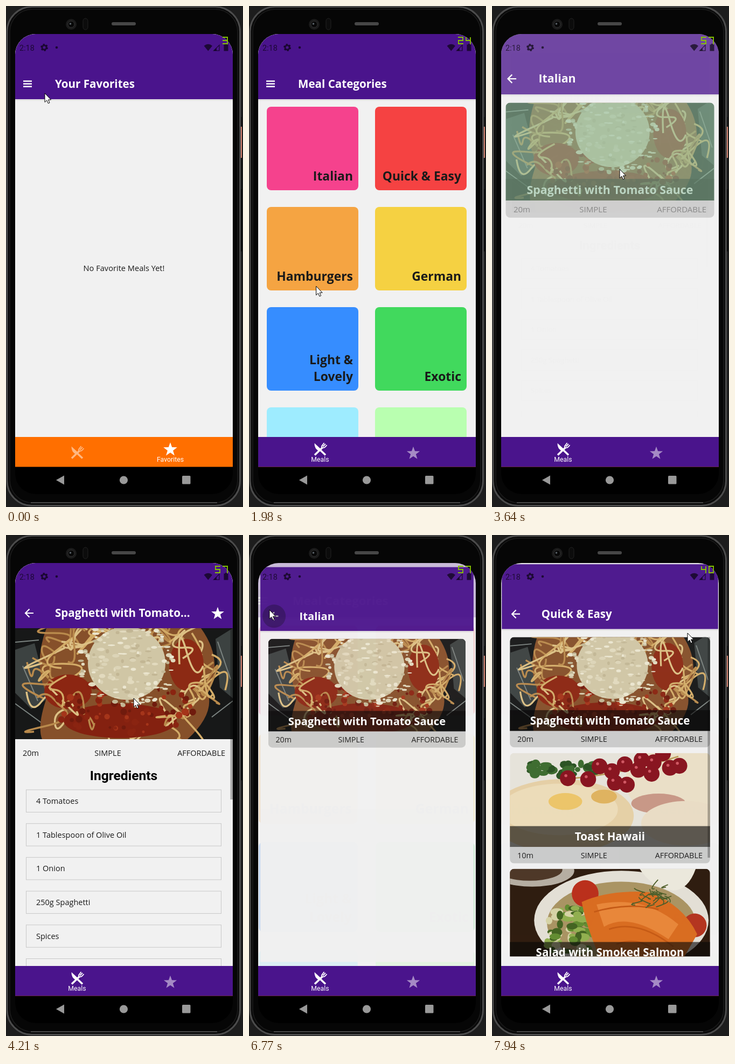
An HTML page that plays this animation: 440 by 930 pixels, repeating every 8 s.

```html
<!DOCTYPE html>
<html lang="en">
<head>
<meta charset="utf-8">
<title>Meals app</title>
<style>
html, body { margin: 0; width: 100%; height: 100%; overflow: hidden; background: #1d1d1d; }
svg { display: block; }
text { font-family: "Open Sans", sans-serif; white-space: pre; }
.b { font-weight: 700; }
.r { font-family: Roboto, sans-serif; }
</style>
</head>
<body>
<svg id="stage" width="440" height="930" viewBox="0 0 440 930"></svg>
<script>
const LOOP = 8000, PURPLE = '#4a148c', ORANGE = '#ff6f00', PAPER = '#f1f1f1';
const clamp = v => Math.max(0, Math.min(1, v));
let seed = 7;
const rnd = (a = 0, b = 1) => {
  seed = (seed * 16807) % 2147483647;
  return a + (b - a) * seed / 2147483647;
};
const pick = list => list[Math.floor(rnd(0, list.length))];
const times = (n, f) => Array.from({ length: n }, (_, i) => f(i)).join('');

// ---- drawing helpers
const rect = (x, y, w, h, fill, more = '') => `<rect x="${x}" y="${y}" width="${w}" height="${h}" fill="${fill}" ${more}/>`;
const oval = (x, y, rx, ry, fill, more = '') => `<ellipse cx="${x}" cy="${y}" rx="${rx}" ry="${ry}" fill="${fill}" ${more}/>`;
const dot = (x, y, r, fill, more) => oval(x, y, r, r, fill, more);
const path = (d, fill, more = '') => `<path d="${d}" fill="${fill}" ${more}/>`;
const line = (d, color, w, more = '') => path(d, 'none', `stroke="${color}" stroke-width="${w}" ${more}`);
const text = (x, y, str, size, fill = '#1a1a1a', cls = '', anchor = 'start') =>
  `<text x="${x}" y="${y}" font-size="${size}" fill="${fill}" class="${cls}" text-anchor="${anchor}">${str}</text>`;
const group = (id, body, more = '') => `<g id="${id}" ${more}>${body}</g>`;

// ---- dishes, each in a 404 x 206 box
function pasta() {
  const around = (cx, cy, rx, ry, f) => {
    const a = rnd(0, 6.283), r = Math.sqrt(rnd());
    return f(cx + rx * r * Math.cos(a), cy + ry * r * Math.sin(a));
  };
  const strand = () => {
    const a = rnd(0, 6.283), x = 207 + 145 * Math.cos(a), y = 90 + 100 * Math.sin(a);
    const q = () => rnd(-34, 34).toFixed(0);
    return line(`M${x.toFixed(0)} ${y.toFixed(0)}q${q()} ${q()} ${q()} ${q()}t${q()} ${q()}`, pick(['#d3ac68', '#b98a4c', '#dcc084']), 3.5);
  };
  return rect(0, 0, 404, 206, '#171818')
    + path('M0 40L36 28 62 130 30 150 0 120ZM372 20L404 0V130L380 110Z', '#3c4241')
    + line('M0 26L44 22M14 70L42 135M0 140L55 180M376 25L400 95M365 165L404 135', '#7c8481', 2)
    + path('M58 0Q32 70 60 125 40 180 50 206H320Q370 160 358 120 388 60 345 0Z', '#86502a')
    + times(55, strand)
    + oval(98, 118, 44, 32, '#8c2612') + oval(195, 172, 105, 32, '#842110') + oval(318, 68, 32, 48, '#8c2a14')
    + times(32, strand)
    + times(90, () => around(205, 145, 140, 50, (x, y) => dot(x, y, rnd(2, 7), pick(['#a5351a', '#701b0d', '#8a2411']))))
    + oval(207, 65, 72, 68, '#d0c6a5')
    + times(170, () => around(207, 66, 90, 84, (x, y) => oval(x, y, rnd(2, 7), rnd(1, 4), pick(['#ebe6d0', '#dcd4b7', '#c2b694', '#e2dabe']))));
}
function toast() {
  const berries = [[117, 59], [158, 61], [181, 35], [206, 45], [212, 68], [236, 72], [232, 31], [259, 42],
    [266, 22], [290, 27], [309, 9], [323, 38], [342, 34], [286, 50]];
  return rect(0, 0, 404, 206, '#e6e3da')
    + oval(345, 65, 112, 80, '#eadfc6') + oval(300, 110, 55, 20, '#c79684') + oval(355, 150, 90, 45, '#e9dcc4')
    + oval(105, 135, 145, 74, '#e5cfa4') + oval(100, 122, 118, 52, '#ecdcb8')
    + oval(112, 106, 34, 17, '#ecc466') + oval(190, 96, 26, 14, '#dfb25c')
    + times(34, () => oval(rnd(40, 175), rnd(28, 56), rnd(5, 13), rnd(4, 9), pick(['#27501f', '#3a692c'])))
    + line('M120 60Q230 50 340 15', '#b89a55', 3)
    + berries.map(([x, y]) => dot(x, y, 16, '#860f1b') + dot(x - 4, y - 5, 3, '#cf5560')).join('');
}
function salad() {
  return rect(0, 0, 404, 206, '#2a1709')
    + oval(45, 12, 85, 32, '#b5ada0') + oval(40, 10, 66, 22, '#4a3322')
    + oval(225, 112, 176, 100, '#e3dfd5') + oval(225, 118, 150, 84, '#a8925f')
    + path('M262 8H375Q360 50 330 52 285 45 262 8Z', '#ece8dc')
    + times(60, () => oval(rnd(75, 165), rnd(80, 175), rnd(5, 14), rnd(4, 10), pick(['#5f8a2c', '#8fae4b', '#d6d3a4', '#3f601c'])))
    + dot(152, 58, 27, '#b92a16') + dot(373, 122, 24, '#b3301a')
    + path('M145 75Q200 50 280 55 350 80 378 140L340 206H190Q155 130 145 75Z', '#d9691b')
    + path('M175 80Q270 60 340 120L320 150Q240 95 190 125Z', '#e88435')
    + line('M200 130Q260 110 330 165M215 160Q270 140 310 190M170 95Q240 75 300 90', '#c4560f', 3)
    + times(26, () => line(`M${rnd(250, 320).toFixed(0)} ${rnd(45, 80).toFixed(0)}q${rnd(-20, 20).toFixed(0)} 4 ${rnd(-25, 25).toFixed(0)} ${rnd(-18, 18).toFixed(0)}`, '#4a5a24', 2));
}
const photo = (id, x, y, w, h) =>
  `<svg x="${x}" y="${y}" width="${w}" height="${h}" viewBox="0 0 404 206" preserveAspectRatio="xMidYMid slice"><use href="#${id}"/></svg>`;

// ---- screens
const back = line('M51 145H37M43.5 137.5L36 145 43.5 152.5', '#fff', 2.2);
const menu = line('M32 139.5H48M32 144.5H48M32 149.5H48', '#fff', 2.3);
const header = (title, icon) => rect(17, 173, 404, 3, '#000', 'opacity=".06"') + rect(17, 52, 404, 121, PURPLE)
  + icon + text(91, 152, title, 20.6, '#fff', 'b');
const screen = (id, body, title, icon = back) =>
  group(id, rect(17, 52, 404, 748, PAPER) + body + header(title, icon) + dot(43, 145, 22, '#000', 'class="ripple" opacity="0"'));
const facts = (y, left, right, time) => text(left, y, time, 14.5) + text(189, y, 'SIMPLE', 14.5, '#1a1a1a', '', 'middle')
  + text(right, y, 'AFFORDABLE', 14.5, '#1a1a1a', '', 'end');
const rounded = (y, body) => `<g clip-path="url(#cardClip)" transform="translate(0 ${y})">${body}</g>`;
const card = (y, dish, title, time) => rounded(y, photo(dish, 32, 0, 374, 175.5)
  + rect(32, 136.5, 374, 39, '#000', 'opacity=".62"') + text(219, 163.5, title, 20.6, '#fff', 'b', 'middle')
  + rect(32, 175.3, 374, 31, '#cacaca') + facts(196, 46, 392, time));
const spaghetti = card(188, 'pasta', 'Spaghetti with Tomato Sauce', '20m');

const tiles = [['#f5428d', 'Italian'], ['#f54242', 'Quick &amp; Easy'], ['#f5a442', 'Hamburgers'], ['#f5d142', 'German'],
  ['#368dff', 'Light &amp;|Lovely'], ['#41d95d', 'Exotic'], ['#9eecff', ''], ['#b9ffb0', '']];
const tile = ([color, name], i) => {
  const x = i % 2 ? 234 : 33, y = 187 + 186 * (i >> 1), rows = name.split('|');
  return group('tile' + i, rect(x, y, 170, 155, color, 'rx="8"')
    + rows.map((s, k) => text(x + 160, y + 137 - 30.6 * (rows.length - 1 - k), s, 22.9, '#1a1a1a', 'b', 'end')).join(''));
};
const items = ['4 Tomatoes', '1 Tablespoon of Olive Oil', '1 Onion', '250g Spaghetti', 'Spices', ''];
const item = (s, i) => rect(37.5, 473 + 62.7 * i, 362, 41.5, PAPER, 'stroke="#c8c8c8"') + text(56, 499 + 62.7 * i, s, 14.5);

const star = (cx, cy, r) => path('M' + Array.from({ length: 10 }, (_, i) => {
  const a = i * Math.PI / 5, q = i % 2 ? r * 0.4 : r;
  return `${(cx + q * Math.sin(a)).toFixed(1)} ${(cy - q * Math.cos(a)).toFixed(1)}`;
}).join('L') + 'Z', '#fff');
const cutlery = line('M-10 10.5L4 -3M0 1L10 10.5', '#fff', 3.6)
  + path('M-10.5 -11.5L2 0 -1.5 3.5Q-11 -1 -10.5 -11.5Z', '#fff')
  + line('M7.5 -12L3 -6Q2 -3 5 -3 8 -2 12.5 -8M10 -10L5 -5', '#fff', 1.8);

const list = group('tint', rounded(188, rect(32, 0, 374, 175.5, '#5aa06e') + rect(32, 175.5, 374, 31, '#c4c4c4'))) + group('dish', spaghetti);
const meal = photo('pasta', 17, 173, 404, 206) + facts(410, 31, 407, '20m')
  + text(218.5, 455, 'Ingredients', 24.6, '#000', 'b r', 'middle') + items.map(item).join('')
  + rect(416.5, 173, 4.5, 318, '#000', 'id="bar" opacity="0"');
const quick = '<g clip-path="url(#feedClip)">' + spaghetti
  + card(404.6, 'toast', 'Toast Hawaii', '10m') + card(621, 'salad', 'Salad with Smoked Salmon', '15m')
  + rect(401.5, 188, 4.5, 412, '#000', 'opacity=".3"') + '</g>';

const INK = 'rgba(0,0,0,.62)';
const status = text(25, 82.5, '2:18', 14.4, INK, 'r') + dot(71, 77, 4, 'none', `stroke="${INK}" stroke-width="3"`)
  + dot(71, 77, 6, 'none', `stroke="${INK}" stroke-width="2" stroke-dasharray="3.1 3.18"`) + dot(94, 77, 2.3, INK)
  + path('M367.5 74Q375.5 67.5 383 74L375.3 83.5ZM404.5 71.5H407V70H410V71.5H412.5V83.5H404.5Z', INK)
  + line('M396 72.5V82.8H385.7Z', INK, 1.3) + path('M391 78V83H386Z', INK);

const phone = rect(0, 0, 440, 930, '#1d1d1d')
  + rect(434, 206, 4, 250, '#111') + rect(434, 224, 4, 58, '#d98470', 'rx="1"') + rect(435, 340, 3, 115, '#050505')
  + rect(2, 1.5, 432.5, 926, '#0a0a0a', 'rx="46" stroke="#4c4c4c" stroke-width="3"')
  + rect(7, 6, 423, 916, '#060606', 'rx="42" stroke="#1c1c1c" stroke-width="1.5"')
  + line('M46 922H392', '#5a5a5a', 1.5)
  + rect(196, 30, 45, 6, '#474747', 'rx="3"')
  + dot(121, 34, 10, '#1b1b1b') + dot(121, 34, 6, '#070707', 'stroke="#333"') + dot(119.5, 33, 1.8, '#5a6268')
  + rect(143, 23, 9, 21, '#0c0c0c', 'rx="4.5" stroke="#232323"')
  + rect(17, 52, 404, 854, '#000', 'rx="38"')
  + path('M93 880L108 871.5V888.5Z', '#999') + dot(218.5, 880, 7.6, '#999') + rect(327, 872, 15.5, 15.5, '#999', 'rx="1.5"');

const stage = document.getElementById('stage');
stage.innerHTML = `<defs>
  <g id="pasta">${pasta()}</g><g id="toast">${toast()}</g><g id="salad">${salad()}</g>
  <clipPath id="cardClip"><rect x="32" y="0" width="374" height="206" rx="8"/></clipPath>
  <clipPath id="feedClip"><rect x="17" y="173" width="404" height="611.5"/></clipPath>
  <clipPath id="glassClip"><path d="M17 800V90a38 38 0 0 1 38-38H383a38 38 0 0 1 38 38V800Z"/></clipPath>
  <clipPath id="tabClip"><rect x="17" y="800" width="404" height="55.5"/></clipPath>
  </defs>` + phone + '<g clip-path="url(#glassClip)">' + rect(17, 52, 404, 748, PAPER)
  + screen('cats', tiles.map(tile).join(''), 'Meal Categories', menu)
  + screen('list', list, 'Italian')
  + screen('meal', meal, 'Spaghetti with Tomato…', back + star(393, 146, 12.5))
  + screen('quick', quick, 'Quick &amp; Easy')
  + screen('favs', text(219, 492, 'No Favorite Meals Yet!', 14.6, '#1a1a1a', '', 'middle'), 'Your Favorites', menu)
  + '</g><g clip-path="url(#tabClip)">' + rect(17, 800, 404, 56, ORANGE) + dot(132, 828, 0, PURPLE, 'id="wave"')
  + group('fork', cutlery) + group('star', star(0, 0, 13.5))
  + group('forkName', text(132, 846, 'Meals', 12.3, '#fff', 'r', 'middle'))
  + group('starName', text(305, 846, 'Favorites', 12.3, '#fff', 'r', 'middle'))
  + '</g>' + status + line('', '#86c400', 1.8, 'id="rate"')
  + path('M0 0V16.5L3.8 13 6.3 18.8 9 17.6 6.5 12H11.5Z', '#fff', 'id="mouse" stroke="#000" stroke-width="1"');

// ---- timeline
const el = id => document.getElementById(id);
const set = (id, name, v) => el(id).setAttribute(name, v);
const ripples = document.querySelectorAll('.ripple');
const screens = ['cats', 'list', 'meal', 'quick', 'favs'];
const beats = [[0, 9], [1200, 11], [2640, 5], [3360, 1], [3640, 11], [5300, 11], [6770, 9], [7940, 1], [LOOP, 1]];
// [start, leaving screen, arriving screen, push or pop]
const moves = [[2457, 'cats', 'list', 1], [3586, 'list', 'meal', 1], [5800, 'meal', 'list', 0],
  [6741, 'list', 'cats', 0], [7677, 'cats', 'quick', 1]];
const trail = [[0, 72, 162], [350, 88, 270], [620, 282, 490], [850, 148, 650], [1050, 136, 790], [1200, 128, 826],
  [1420, 128, 826], [2200, 122, 277], [2640, 122, 277], [3200, 237, 303], [4680, 237, 303], [5300, 54, 148],
  [5560, 38, 139], [6850, 38, 139], [7420, 335, 250], [7680, 335, 250], [7940, 363, 182], [LOOP, 363, 182]];
const rates = [[0, '3'], [1200, '11'], [1580, '24'], [2360, '33'], [2900, '57'], [4900, '59'], [6300, '57'], [7500, '40']];
const bars = { a: 'M0 0H10', b: 'M9 0V6', c: 'M9 6V13', d: 'M0 12H10', e: 'M1 6V12', f: 'M1 0V6', g: 'M0 6H10', i: 'M4.5 -1V13' };
const digits = ['abcdef', 'i', 'abdeg', 'abcdg', 'bcfg', 'acdfg', 'acdefg', 'abc', 'abcdefg', 'abcdfg'];
const last = (rows, t) => rows.findLastIndex(e => e[0] <= t);

function stepTime(t) {
  const i = last(beats, t), [a, n] = beats[i], size = (beats[i + 1][0] - a) / n;
  return a + size * Math.floor((t - a) / size);
}
function pose(id, scale, alpha) {
  set(id, 'opacity', clamp(alpha));
  set(id, 'transform', `translate(219 426) scale(${scale}) translate(-219 -426)`);
}
function draw(t) {
  screens.forEach(id => pose(id, 1, 0));
  const m = moves[last(moves, t)];
  if (!m) pose(t < 1400 ? 'favs' : 'cats', 1, 1);
  else {
    const [start, from, to, push] = m, e = 1 - (1 - clamp((t - start) / 400)) ** 3;
    pose(from, 1 + (push ? 0.1 : -0.1) * e, 1.19 - 1.19 * e);
    pose(to, push ? 0.85 + 0.15 * e : 1.1 - 0.1 * e, push ? (e - 0.35) / 0.63 : e * 1.2);
  }

  const pressed = t >= 3350 && t < 4000;
  set('dish', 'opacity', pressed ? 0.5 : 1);
  set('tint', 'opacity', pressed ? 1 : 0);
  set('tile0', 'opacity', t > 2300 && t < 2900 ? 0.5 : 1);
  set('tile1', 'opacity', t > 7530 ? 0.5 : 1);
  const tap = (t > 5600 && t < 6100) || (t > 6600 && t < 7100) ? 0.28 : 0;
  ripples.forEach(r => r.setAttribute('opacity', tap));
  set('bar', 'opacity', 0.3 * clamp((5400 - t) / 250));

  const k = clamp((t - 1250) / 250), wave = 330 * clamp((t - 1250) / 350);
  set('wave', 'rx', wave);
  set('wave', 'ry', wave);
  set('fork', 'transform', `translate(132 ${829 - 6 * k})`);
  set('star', 'transform', `translate(305 ${823.5 + 7 * k}) scale(${1 - 0.05 * k})`);
  set('fork', 'opacity', 0.5 + 0.5 * k);
  set('star', 'opacity', 1 - 0.5 * k);
  set('forkName', 'opacity', k);
  set('starName', 'opacity', 1 - k);

  const rate = rates[last(rates, t)][1];
  set('rate', 'd', [...rate].map((c, i) => {
    const x = 402 - 14 * (rate.length - 1 - i);
    return [...digits[c]].map(s => bars[s].replace(/M(\S+) (\S+?)([HV])(\S+)/, (_, a, b, dir, v) =>
      `M${x + +a} ${58 + +b}${dir}${+v + (dir === 'H' ? x : 58)}`)).join('');
  }).join(''));

  const i = last(trail, t), [t0, x0, y0] = trail[i], [t1, x1, y1] = trail[Math.min(i + 1, trail.length - 1)];
  const p = t1 > t0 ? (t - t0) / (t1 - t0) : 0;
  set('mouse', 'transform', `translate(${x0 + (x1 - x0) * p} ${y0 + (y1 - y0) * p})`);
}
function frame() {
  draw(stepTime(performance.now() % LOOP));
  requestAnimationFrame(frame);
}
frame();
</script>
</body>
</html>
```
